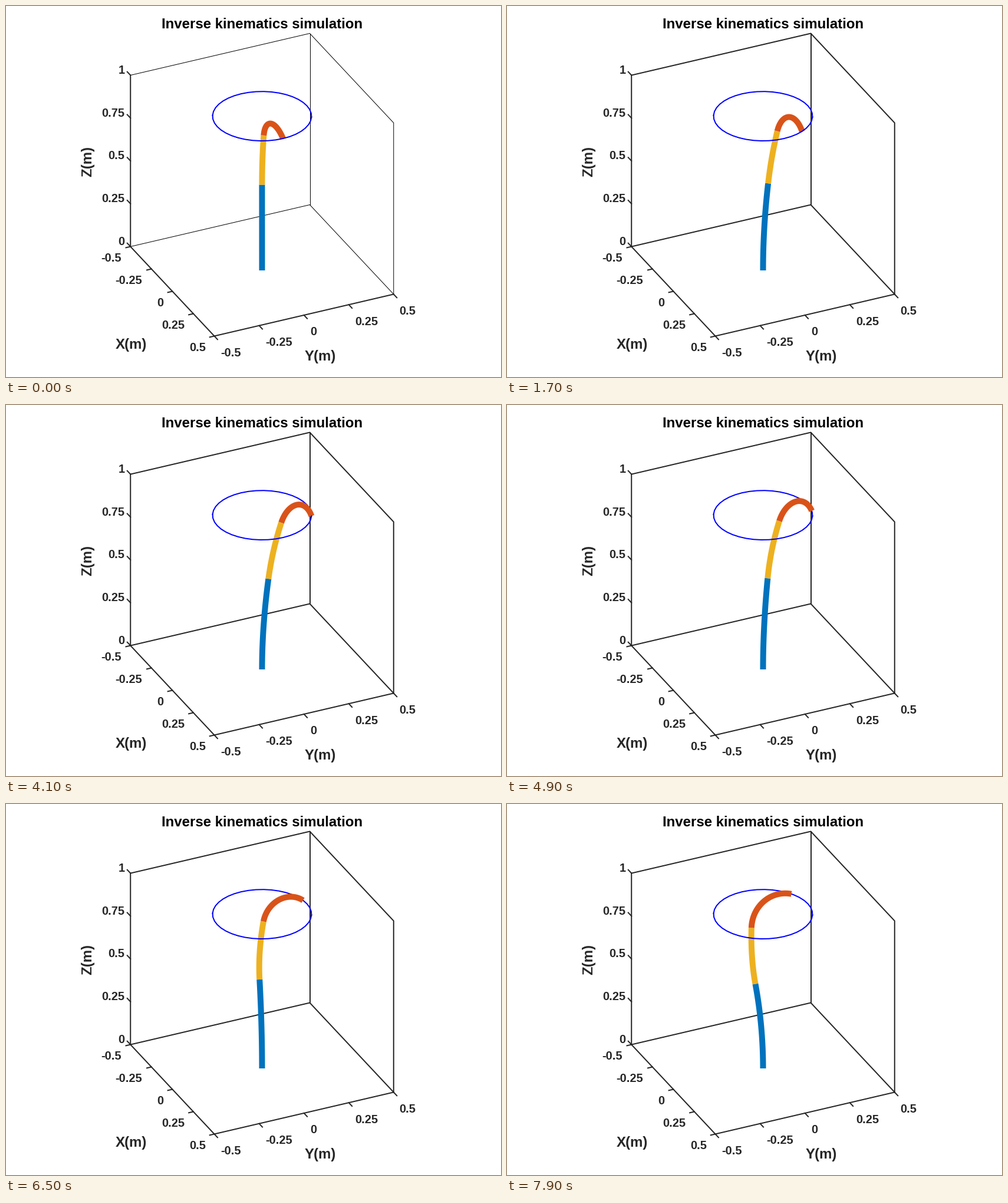
Animation, 840 px wide and 630 px high, one loop 8 s. Source, as a matplotlib script:

```python
import numpy as np
import matplotlib.pyplot as plt
from matplotlib.animation import FuncAnimation

W, H, DPI = 840, 630, 100
PT = 72 / DPI
INK = "#262626"
BLUE, YELLOW, RED = "#0072BD", "#EDB120", "#D95319"
AZ = np.radians(64.94)
CIRCLE_R, CIRCLE_Z = 0.25, 0.9
STEP = 3  # degrees travelled along the circle per pose

plt.rcParams["font.family"] = "Liberation Sans"
plt.rcParams["font.weight"] = "bold"

fig = plt.figure(figsize=(W / DPI, H / DPI), dpi=DPI, facecolor="white")
ax = fig.add_axes([0, 0, 1, 1])
ax.set_xlim(0, W)
ax.set_ylim(H, 0)
ax.axis("off")


def view(x, y, z):
    """World axes to (right, toward viewer, up)."""
    return np.array([np.cos(AZ) * x + np.sin(AZ) * y,
                     np.sin(AZ) * x - np.cos(AZ) * y,
                     z + 0 * x])


def screen(p):
    return 434.5 + 335.9 * p[0], 449 + 167.7 * p[1] - 291 * p[2]


def world(x, y, z):
    return np.array(screen(view(x, y, z)))


def path(points, width, color, **kw):
    xs, ys = zip(*points)
    return ax.plot(xs, ys, color=color, lw=width * PT, **kw)[0]


def label(x, y, s, size=20, ha="center", color=INK, **kw):
    ax.text(x, y, s, fontsize=size * PT, ha=ha, va="baseline", color=color, **kw)


# Box
def corner(x, y, z):
    return world(x - 0.5, y - 0.5, z)


back_edges = [
    path([corner(*p) for p in run], 1, "black", zorder=1)
    for run in (
        [(0, 0, 1), (0, 1, 1), (1, 1, 1), (1, 1, 0)],
        [(0, 0, 0), (0, 1, 0), (1, 1, 0)],
        [(0, 1, 0), (0, 1, 1)],
    )
]
path([corner(*p) for p in [(0, 0, 1), (0, 0, 0), (1, 0, 0), (1, 1, 0)]],
     2, INK, zorder=1)


# Ticks and labels
def tick(p, direction):
    path([p, p + 8 * direction / np.hypot(*direction)], 2, INK, zorder=1)


x_dir = world(1, 0, 0) - world(0, 0, 0)
y_dir = world(0, 1, 0) - world(0, 0, 0)
names = ["-0.5", "-0.25", "0", "0.25", "0.5"]
heights = ["0", "0.25", "0.5", "0.75", "1"]
for i in range(5):
    s = i / 4
    tick(corner(0, 0, s), -x_dir)
    tick(corner(s, 0, 0), -y_dir)
    tick(corner(1, s, 0), x_dir)
    label(201.5, 406 - 72.8 * i, heights[i], ha="right")
    label(195.5 + 35.8 * i, 434 + 38 * i, names[i], ha="right")
    label(364.5 + 75.8 * i, 595 - 17.8 * i, names[i], ha="left")

label(434.5, 38, "Inverse kinematics simulation", 24, color="black")
label(212.5, 582, "X(m)", 24)
label(533.5, 602, "Y(m)", 24)
label(145, 263.5, "Z(m)", 24, rotation=90, rotation_mode="anchor")


# Target circle, the near half passes in front of the arm
def on_circle(deg):
    a = np.radians(deg)
    return view(CIRCLE_R * np.cos(a), CIRCLE_R * np.sin(a), CIRCLE_Z)


for start, layer in ((63, 2), (-117, 6)):
    ax.plot(*screen(on_circle(np.arange(start, start + 181, 9))),
            color="blue", lw=2 * PT, zorder=layer)

# Sideways and depth offsets of the two inner joints at a few poses
KEYS = np.array([0, 5, 13, 21, 29, 33, 40]) / 40
JOINTS = [np.polyfit(KEYS, v, 5) for v in (
    [0, .0164, .0327, .0313, .0089, -.0134, -.0387],
    [0, -.0066, -.0317, -.0577, -.0630, -.0335, .0083],
    [.0089, .0491, .0908, .0938, .0551, .0045, -.0581],
    [.0190, -.0077, -.0670, -.1350, -.1820, -.1450, -.0650],
)]


def half_angle(t, chord):
    c = t @ chord / np.linalg.norm(chord)
    return max(np.arccos(np.clip(c, -1, 1)), 1e-6)


def arc(p, t, q):
    """Circular arc from p along t to q, and its end direction."""
    chord = q - p
    h = half_angle(t, chord)
    n = chord - (chord @ t) * t
    n /= np.linalg.norm(n) + 1e-12
    r = np.linalg.norm(chord) / (2 * np.sin(h))
    s = np.linspace(0, 2 * h, 40)
    pts = (p[:, None] + r * np.outer(t, np.sin(s))
           + r * np.outer(n, 1 - np.cos(s)))
    return pts, t * np.cos(2 * h) + n * np.sin(2 * h)


def reach(p, t, side, length):
    """Joint at the given offsets on an arc of the given length."""
    dx, dy = side - p[:2]
    c = length
    for _ in range(4):
        chord = np.array([dx, dy, np.sqrt(c * c - dx * dx - dy * dy)])
        h = half_angle(t, chord)
        c = length * np.sin(h) / h
    return p + chord


arms = [path([(0, 0), (0, 0)], 10, col, zorder=3 + i, solid_capstyle="butt")
        for i, col in enumerate((BLUE, YELLOW, RED))]


def draw(i):
    pose = (i + 1) // 2
    ax1, ay1, ax2, ay2 = (np.polyval(c, pose / 40) for c in JOINTS)
    for edge in back_edges:
        edge.set_linewidth((2 if pose else 1) * PT)
        edge.set_color(INK if pose else "black")

    p, t = np.zeros(3), np.array([0.0, 0.0, 1.0])
    sections = (((ax1, ay1), 0.5), ((ax2, ay2), 0.3), (None, None))
    for line, (side, length) in zip(arms, sections):
        if side is None:
            q = on_circle(STEP * pose)
        else:
            q = reach(p, t, np.array(side), length)
        pts, t = arc(p, t, q)
        line.set_data(*screen(pts))
        p = q
    return arms + back_edges


anim = FuncAnimation(fig, draw, frames=80, interval=100, repeat=True,
                     repeat_delay=0, blit=False)
plt.show()
```
